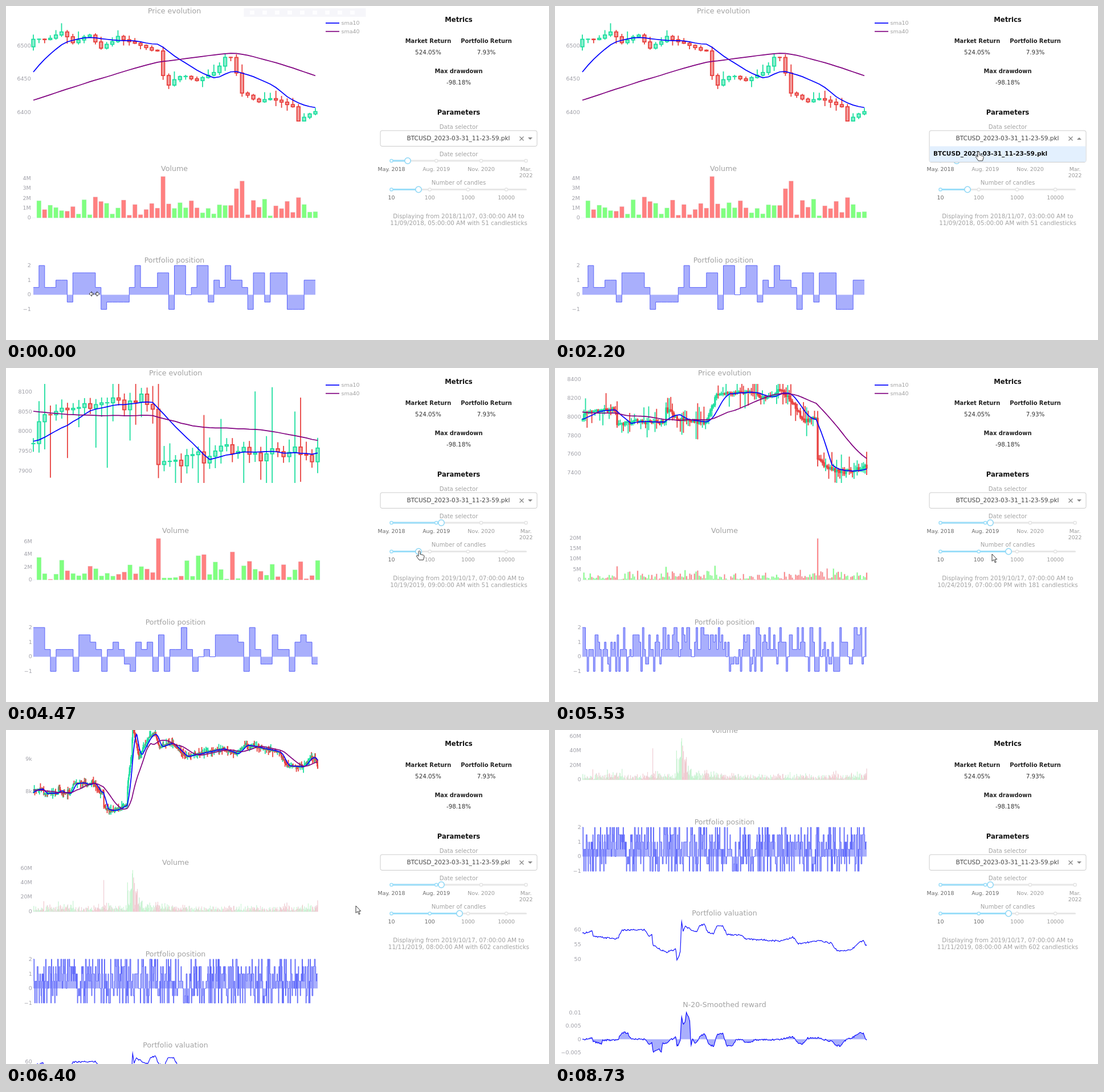
An HTML page with a canvas that plays this animation: 953 by 587 pixels, repeating every 9.79 s.

```html
<!DOCTYPE html>
<html lang="en">
<head>
<meta charset="utf-8">
<title>Trading dashboard</title>
<style>
html, body { margin: 0; width: 100%; height: 100%; overflow: hidden; background: #fff; }
canvas { display: block; }
</style>
</head>
<body>
<canvas id="stage" width="953" height="587"></canvas>
<script>
const ctx = document.getElementById('stage').getContext('2d');
const LOOP = 9790, TICK = 1000 / 15;
const GREEN = '#1edf9f', RED = '#e8413f', GREY = '#a2a2a2', SKY = '#9bdef9';
const BLUE = '#0000ff', PURPLE = '#800080';

const clamp = (v, min = 0, max = 1) => Math.min(max, Math.max(min, v));
const ease = p => p * p * (3 - 2 * p);
const range = n => Array.from({ length: n }, (_, i) => i);
const mean = (n, value) => range(n).reduce((sum, j) => sum + value(j), 0) / n;
const random = (i, salt) => {
  const v = Math.sin(i * 12.9898 + salt * 78.233) * 43758.5453;
  return v - Math.floor(v);
};
// Linear interpolation through a flat list x, y, x, y, ...
function along(points, x) {
  let i = 0;
  while (i < points.length - 4 && points[i + 2] < x) i += 2;
  const [x0, y0, x1, y1] = points.slice(i, i + 4);
  return y0 + (y1 - y0) * clamp((x - x0) / (x1 - x0));
}
function niceStep(span, most) {
  for (let unit = 0.1; ; unit *= 10)
    for (const m of [1, 2, 5]) if (span / (m * unit) <= most) return Math.round(m * unit * 10) / 10;
}

// A market is a rough price course (hour, price) plus seeded noise; it starts 40 hours early for the averages.
function market(salt, noise, course) {
  const last = course[course.length - 2];
  const prices = range(last + 41).map(k => along(course, k - 40) + (random(k, salt) - .5) * noise);
  return { salt, noise, price: i => prices[Math.max(0, i + 40)] };
}
const autumn = market(1, 3, [-40, 6400, -9, 6408, -3, 6480, 0, 6509, 2, 6509, 5, 6520, 7, 6506, 10, 6515, 12, 6497, 15, 6513,
  22, 6491, 23, 6454, 24, 6442, 26, 6455, 29, 6448, 32, 6460, 34, 6482, 35, 6483, 36, 6460, 37, 6428, 40, 6417, 42, 6421,
  46, 6408, 47, 6388, 50, 6402]);
const spring = market(2, 5, [-40, 5078, -10, 5085, -9, 5120, 0, 5203, 1, 5231, 5, 5234, 9, 5200, 12, 5255, 13, 5193, 20, 5238,
  25, 5222, 26, 5266, 29, 5279, 31, 5273, 34, 5242, 36, 5237, 38, 5264, 40, 5250, 43, 5274, 45, 5309, 47, 5281, 49, 5275,
  50, 5218]);
const october = market(3, 42, [-40, 8095, -12, 8075, -10, 7975, 0, 7975, 2, 8060, 21, 8075, 22, 7900, 32, 7950, 52, 7940,
  53, 8085, 61, 7975, 78, 7940, 85, 8230, 104, 8260, 117, 8200, 126, 8290, 133, 8150, 140, 7960, 148, 7990, 149, 7540,
  157, 7440, 167, 7410, 181, 7470, 198, 7600, 200, 8300, 208, 9100, 210, 10100, 223, 9050, 246, 9700, 258, 9790, 267, 9350,
  292, 9500, 322, 9070, 400, 9316, 430, 9150, 449, 9440, 521, 9210, 536, 8790, 570, 8760, 587, 9060, 597, 9010, 601, 8740]);
const levels = [-1, -1, -.5, 0, .5, .5, 1, 1, 1.5, 1.5, 2, 2];

function makeView({ salt, noise, price }, n, [x0, x1], [low, high], volMax, from, to) {
  const hours = range(n), dx = (x1 - x0) / (n - 1), titleX = (x0 + x1) / 2;
  const scale = 174 / (high - low), y = p => 202 - (p - low) * scale;
  const move = i => Math.abs(price(i) - price(i - 1));
  const wick = (i, side) => noise * (.3 + 4 * random(i, salt + side) ** 4) + move(i) * .15;
  const candles = hours.map(i => {
    const open = price(i - 1), close = price(i);
    return {
      falling: close < open,
      top: y(Math.max(open, close)), bottom: y(Math.min(open, close)),
      high: y(Math.min(high, Math.max(open, close) + wick(i, 10))),
      low: y(Math.max(low, Math.min(open, close) - wick(i, 20)))
    };
  });
  // Trading grows with the price move and stays high for a while afterwards.
  const trades = hours.map(i => i && move(i) + (noise + 2 * mean(14, j => move(i - j))) * random(i, salt + 30) ** 2);
  const busiest = Math.max(...trades);
  const positions = [];
  hours.forEach(i => positions.push(i && random(i, salt + 40) < .2 ? positions[i - 1]
    : levels[Math.floor(random(i, salt + 50) * levels.length)]));
  const step = niceStep(high - low, 6), ticks = [];
  for (let p = Math.ceil((low - 9 / scale) / step) * step; y(p) > 18.5; p += step)
    ticks.push([step >= 500 ? p / 1000 + 'k' : p, y(p)]);
  const average = size => hours.flatMap(i => [x0 + i * dx, y(mean(size, j => price(i - j)))]);
  return {
    x0, dx, titleX, tickX: titleX - 251.8, ticks, candles, positions, volMax,
    volume: trades.map(v => v / busiest * 73), fast: average(10), slow: average(40),
    lines: [`Displaying from ${from} to`, `${to} with ${n} candlesticks`]
  };
}
const octoberStart = '2019/10/17, 07:00:00 AM';
const views = [
  [0, makeView(autumn, 51, [48, 543], [6387, 6536], 4.25, '2018/11/07, 03:00:00 AM', '11/09/2018, 05:00:00 AM')],
  [3260, makeView(spring, 51, [52, 543], [5100, 5324], 3.92, '2019/04/16, 11:00:00 PM', '04/19/2019, 01:00:00 AM')],
  [3720, makeView(october, 51, [48, 547], [7870, 8120], 6.5, octoberStart, '10/19/2019, 09:00:00 AM')],
  [4990, makeView(october, 181, [48, 547], [7292, 8352], 20, octoberStart, '10/24/2019, 07:00:00 PM')],
  [5650, makeView(october, 602, [48, 547], [7290, 10333], 57.5, octoberStart, '11/11/2019, 08:00:00 AM')]
];

// Portfolio value by stage x; the reward is its mean log return over the last 20 candles.
const course = [48, 58.7, 65, 59.6, 67, 57.7, 110, 56.9, 117, 59.8, 157, 60, 165, 57.9, 170, 58.2, 172, 54.8, 195, 52.3,
  212, 53.4, 214, 49.6, 220, 52.5, 222, 62.9, 225, 59.2, 228, 61.2, 249, 59.1, 253, 61.3, 262, 61.9, 268, 59.2, 278, 58.7,
  284, 61.2, 295, 61.2, 302, 58.3, 325, 58.3, 335, 56.9, 395, 56.2, 418, 57.5, 427, 55.2, 465, 56.3, 485, 55.4, 495, 52.9,
  520, 53.1, 535, 56, 541, 56.2, 547, 54.4];
const worth = range(602).map(i => along(course, 48 + i * .83) + (random(Math.floor(i / 2), 6) - .5) * .5);
const overTime = y => worth.flatMap((value, i) => [48 + i * .83, y(value, worth[Math.max(0, i - 20)])]);
const valuationLine = overTime(value => 636 + (60 - value) * 5.2);
const rewardLine = overTime((value, before) => 828.5 - Math.log(value / before) / 20 * 4650);

function text(s, x, y, size, color = GREY, align = 'center', weight = '') {
  ctx.font = `${weight} ${size}px "DejaVu Sans", sans-serif`;
  ctx.fillStyle = color;
  ctx.textAlign = align;
  ctx.textBaseline = 'middle';
  ctx.fillText(s, x, y + .5);
}
function path(points) {
  ctx.beginPath();
  for (let i = 0; i < points.length; i += 2) ctx.lineTo(points[i], points[i + 1]);
}
function stroke(points, color, width) {
  path(points);
  ctx.strokeStyle = color;
  ctx.lineWidth = width;
  ctx.stroke();
}
function fillTo(base, points) {
  path([points[0], base, ...points, points[points.length - 2], base]);
  ctx.fillStyle = 'rgba(99,110,250,.55)';
  ctx.fill();
}
function box(x, y, w, h, color) {
  ctx.fillStyle = color;
  ctx.fillRect(x, y, w, h);
}

function drawCharts(v) {
  const x = i => v.x0 + i * v.dx;
  const tick = (label, y) => text(label, v.tickX, y, 9.5, '#a0a0a8', 'right');
  const title = (label, y) => text(label, v.titleX, y, 12.6);

  title('Price evolution', 9);
  v.ticks.forEach(([label, y]) => tick(label, y));
  v.candles.forEach(({ falling, top, bottom, high, low }, i) => {
    const color = falling ? RED : GREEN, w = v.dx * .56;
    stroke([x(i), high, x(i), top], color, 1.8);
    stroke([x(i), bottom, x(i), low], color, 1.8);
    box(x(i) - w / 2, top, w, bottom - top, color + '80');
    ctx.strokeRect(x(i) - w / 2, top, w, bottom - top);
  });
  stroke(v.fast, BLUE, 1.7);
  stroke(v.slow, PURPLE, 1.7);
  [['sma10', BLUE, 30], ['sma40', PURPLE, 44.7]].forEach(([name, color, y]) => {
    stroke([561, y, 585, y], color, 1.7);
    text(name, 588.5, y, 9.5, GREY, 'left');
  });

  title('Volume', 286);
  const step = niceStep(v.volMax, 5);
  for (let m = 0; m <= v.volMax * 1.05; m += step) tick(m ? m + 'M' : '0', 372 - m / v.volMax * 73);
  v.volume.forEach((h, i) => {
    box(x(i) - v.dx * .4, 372.5 - h, v.dx * .8, h, v.candles[i].falling ? '#ff8080' : '#80ff80');
    ctx.strokeStyle = '#e5ecf6';
    ctx.lineWidth = .4;
    ctx.strokeRect(x(i) - v.dx * .4, 372.5 - h, v.dx * .8, h);
  });

  title('Portfolio position', 447);
  const level = p => 507.5 - p * 25.7;
  [-1, 0, 1, 2].forEach(p => tick(p < 0 ? '−1' : p, level(p)));
  const steps = v.positions.flatMap((p, i) => [x(Math.max(0, i - 1)), level(p), x(i), level(p)]);
  fillTo(level(0), steps);
  stroke(steps, '#5a64fa', 1);

  title('Portfolio valuation', 607.5);
  [60, 55, 50].forEach((p, i) => tick(p, 636 + i * 26));
  stroke(valuationLine, BLUE, 1.1);
  title('N-20-Smoothed reward', 768.5);
  ['0.01', '0.005', '0', '−0.005'].forEach((p, i) => tick(p, 782 + i * 23.3));
  fillTo(828.5, rewardLine);
  stroke(rewardLine, BLUE, 1.1);
}

function drawModebar(alpha) {
  ctx.globalAlpha = alpha;
  box(417.5, 4, 214, 15, '#f6f6fa');
  range(9).forEach(i => box(428 + i * 22, 8, 8, 7, '#fdfdff'));
  ctx.globalAlpha = 1;
}

function disc(x, y, r, color) {
  ctx.beginPath();
  ctx.arc(x, y, r, 0, 7);
  ctx.fillStyle = '#fff';
  ctx.fill();
  ctx.strokeStyle = color;
  ctx.lineWidth = 1.5;
  ctx.stroke();
}
function drawSlider(y, handle, gap, labels) {
  ctx.lineCap = 'round';
  stroke([676.5, y, 912.5, y], '#e7e7e7', 3);
  stroke([676.5, y, handle, y], SKY, 3);
  ctx.lineCap = 'butt';
  labels.forEach((label, k) => {
    const x = 676.5 + k * gap, active = x <= handle;
    disc(x, y, 2.6, active ? SKY : '#e4e4e4');
    label.split('\n').forEach((s, i) => text(s, x, y + 15 + i * 11.3, 9.4, active ? '#666' : '#999'));
  });
  disc(handle, y, 5.2, '#8cd6f5');
}

function drawPanel(v, date, count, open) {
  const heading = (s, y) => text(s, 794.5, y, 11.6, '#111', 'center', 'bold');
  const metric = (name, value, x, y) => {
    text(name, x, y, 9.9, '#222', 'center', 'bold');
    text(value, x, y + 19.8, 10.3, '#333');
  };
  heading('Metrics', 24);
  metric('Market Return', '524.05%', 741, 62);
  metric('Portfolio Return', '7.93%', 843, 62);
  metric('Max drawdown', '-98.18%', 794.5, 115);
  heading('Parameters', 187.5);
  text('Data selector', 794.5, 213, 10.1);
  text('Date selector', 794.5, 261, 10.1);
  drawSlider(272, date, 78.7, ['May. 2018', 'Aug. 2019', 'Nov. 2020', 'Mar.\n2022']);
  text('Number of candles', 794.5, 311, 10.1);
  drawSlider(322.5, count, 67.2, ['10', '100', '1000', '10000']);
  v.lines.forEach((line, i) => text(line, 794.5, 370 + i * 11.6, 10.35));

  ctx.beginPath();
  ctx.roundRect(657, 219, 275, open ? 55.5 : 27.5, 3);
  ctx.fillStyle = '#fff';
  ctx.fill();
  ctx.strokeStyle = '#ccc';
  ctx.lineWidth = 1;
  ctx.stroke();
  const file = 'BTCUSD_2023-03-31_11-23-59.pkl';
  text(file, 884.5, 232.5, 10.5, '#444', 'right');
  stroke([901.5, 229.5, 908.5, 236.5], '#888', 1.2);
  stroke([908.5, 229.5, 901.5, 236.5], '#888', 1.2);
  const tip = open ? -2 : 2;
  path([916, 233 - tip, 924, 233 - tip, 920, 233 + tip]);
  ctx.fillStyle = '#888';
  ctx.fill();
  if (open) {
    box(657.5, 246.5, 274, 27.5, '#e3f0fe');
    text(file, 664, 260, 10.5, '#111', 'left', 'bold');
  }
}

const cursors = {
  arrow: 'M0 0V12.5L3 9.8L5.3 15L7.2 14.2L5 9.2H8.7Z',
  hand: 'M-1.5 1Q0-1 1.5 1V6L7 7.5Q9 8 8.5 10.5L7 16H-.5L-5 9.5Q-5 7-2.5 8.5L-1.5 9.5Z',
  grab: 'M-5-3Q-4-6-2-4.5Q0-7 1.5-4.5Q4-6 4.5-3.5Q6.5-4 6.5-1.5V2L4.5 7H-2.5L-6 1.5Q-7-1.5-4.5 0ZM-2-4.5V-1M1.5-4.5V-1M4.5-3.5V-1',
  resize: 'M-9 0L-4.5-4V-1.2H-1.5V1.2H-4.5V4ZM9 0L4.5-4V-1.2H1.5V1.2H4.5V4Z',
  cross: 'M-6 0H6M0-6V6',
  hidden: ''
};
// Start, end, destination and cursor of each mouse move
const moves = [
  [0, 0, 155, 506, 'resize'], [70, 330, 126, 600, 'resize'], [340, 660, 540, 284, 'hidden'],
  [670, 1330, 912, 230, 'arrow'], [1870, 2200, 743.5, 256, 'hand'], [2530, 2800, 705, 269, 'hand'],
  [3000, 3400, 767, 274, 'grab'], [3660, 3930, 761, 305, 'arrow'], [4000, 4530, 724, 322, 'hand'],
  [4660, 5000, 796, 323, 'grab'], [5000, 5200, 767, 327, 'arrow'], [5530, 6000, 614, 309, 'arrow'],
  [7530, 7870, 372, 556, 'cross'], [8060, 8200, 145, 582, 'cross'], [8400, 8660, 74, 600, 'cross']
];
function drawCursor(t) {
  const i = moves.filter(([start]) => start <= t).length - 1;
  const [start, end, x, y, kind] = moves[i], [, , x0, y0] = moves[Math.max(0, i - 1)];
  const p = end > start ? ease(clamp((t - start) / (end - start))) : 1;
  const shape = new Path2D(cursors[kind]);
  ctx.save();
  ctx.translate(x0 + (x - x0) * p, y0 + (y - y0) * p);
  ctx.fillStyle = '#fff';
  ctx.strokeStyle = '#222';
  ctx.lineWidth = .9;
  ctx.fill(shape);
  ctx.stroke(shape);
  ctx.restore();
}

function draw(now) {
  // The picture advances fifteen times a second.
  const t = Math.floor((now % LOOP + 4) / TICK) * TICK;
  const view = views.filter(([start]) => start <= t).pop()[1];
  const between = (from, to) => clamp((t - from) / (to - from));
  const scroll = 285 * between(6133, 6600) ** 3;
  const modebar = t < 600 ? 1 - between(200, 470) : between(640, 800) * (1 - between(1060, 1330));

  box(0, 0, 953, 587, '#fff');
  ctx.save();
  ctx.translate(0, -scroll);
  drawCharts(view);
  drawModebar(modebar);
  ctx.restore();
  drawPanel(view, 705 + 59 * ease(between(3000, 3400)), 724 + 72 * ease(between(4660, 5000)), t > 1900 && t < 2590);
  drawCursor(t);
}

let start;
function loop(now) {
  start ??= now;
  draw(now - start);
  requestAnimationFrame(loop);
}
requestAnimationFrame(loop);
</script>
</body>
</html>
```
